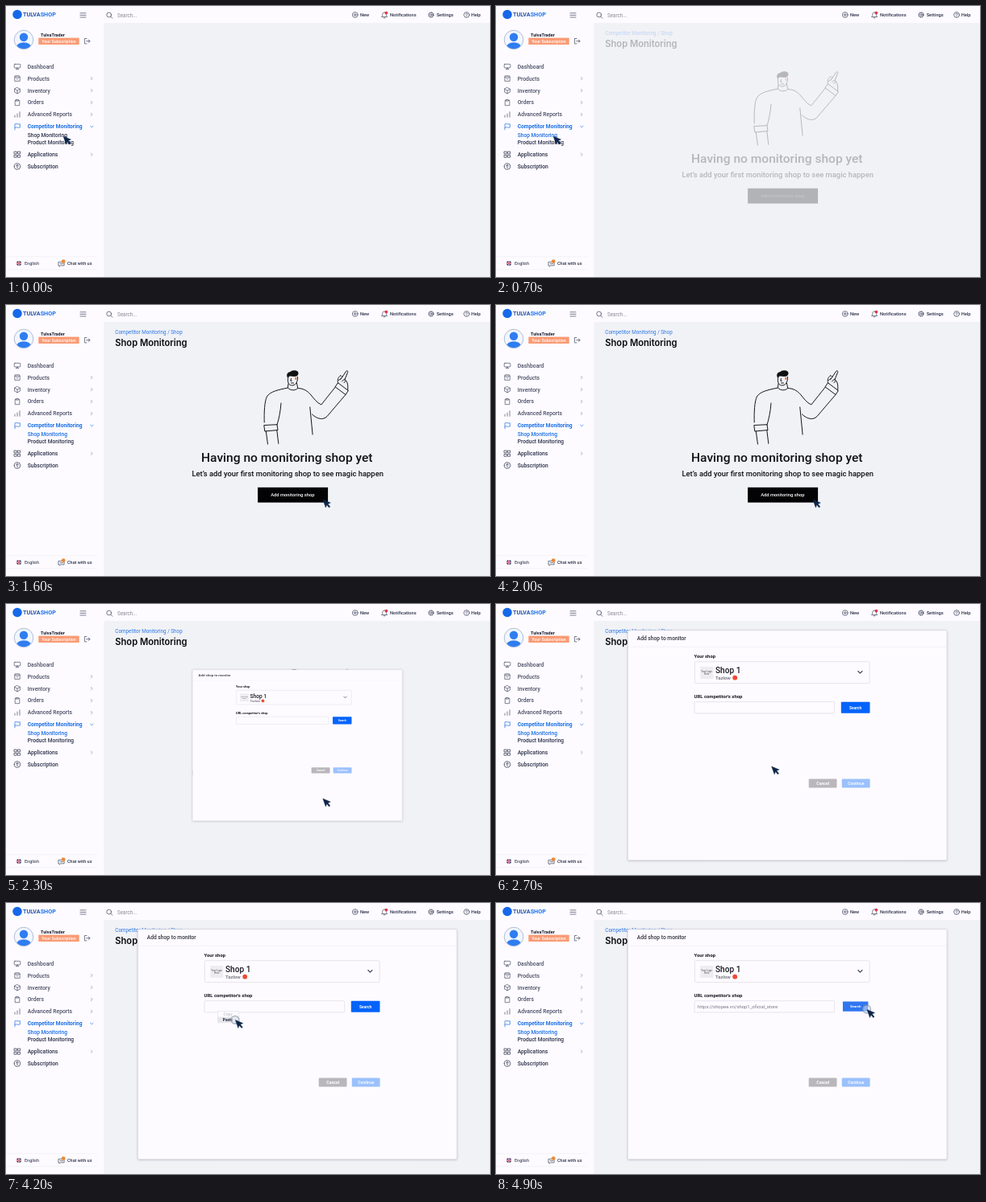
Animation, 600 px wide and 337 px high, one loop 5000 ms. Source, as an HTML page:

```html
<!DOCTYPE html>
<html lang="en">
<head>
<meta charset="utf-8">
<title>Shop monitoring</title>
<style>
html, body { margin: 0; width: 100%; height: 100%; overflow: hidden; background: #fdfbff; }
svg { display: block; width: 100vw; height: 100vh; }
text { font-family: Roboto, "Open Sans", sans-serif; }
.line { fill: none; stroke: #3f455d; stroke-width: .7; stroke-linecap: round; stroke-linejoin: round; }
</style>
</head>
<body>
<svg id="stage" viewBox="0 0 600 337">
  <defs>
    <clipPath id="face"><circle cx="22" cy="42" r="11.3"/></clipPath>
    <filter id="soft" x="-5%" y="-5%" width="110%" height="112%">
      <feDropShadow dx="0" dy=".6" stdDeviation="1.3" flood-color="#50506a" flood-opacity=".35"/>
    </filter>
  </defs>
  <rect width="600" height="337" fill="#fdfbff"/>
  <rect x="121.5" y="21" width="479" height="316" fill="#f1f2f6"/>

  <g id="side">
    <circle cx="14" cy="10.5" r="5.8" fill="#1668e8"/>
    <path class="line" d="M92 8.8h7M92 11.4h7M92 14h7"/>
    <circle cx="22" cy="42" r="11.8" fill="#f1f6ff" stroke="#8395b5" stroke-width=".6"/>
    <g clip-path="url(#face)" fill="#2f7df0">
      <circle cx="22" cy="38.8" r="5.2"/>
      <ellipse cx="22" cy="51.5" rx="9.2" ry="6.3"/>
    </g>
    <rect x="40.3" y="39.6" width="50.4" height="8.4" fill="#fa9a74"/>
    <path class="line" d="M100 40.5h-2.6v6.4h2.6M99.6 43.7h4.4M102.3 42l1.8 1.7-1.8 1.7"/>
    <path d="M0 311.7H113M0 327.7H113" stroke="#f0f0f5" stroke-width=".8"/>
    <circle cx="16" cy="320" r="3" fill="#28407f"/>
    <path d="M13 320h6M16 317v6" stroke="#fff" stroke-width="1.6"/>
    <path d="M13 320h6M16 317v6" stroke="#d33b4b" stroke-width=".9"/>
    <path class="line" d="M65.3 318.4h6.8v4.4h-4.4l-1.6 1.2v-1.2h-.8zM67 320.6h3.4"/>
    <circle cx="71.2" cy="317.6" r="2.4" fill="#e8893a"/>
  </g>

  <g id="top">
    <g class="line">
      <circle cx="127.7" cy="11" r="2.9"/><path d="M129.9 13.2l2 2.1"/>
      <circle cx="432.8" cy="11" r="3.4"/><path d="M430.9 11h3.8M432.8 9.1v3.8"/>
      <path d="M465.8 13.3c1-.8.9-1.5.9-2.8 0-3.4 4.8-3.4 4.8 0 0 1.3 0 2 .9 2.8zM468.2 14.8h1.8"/>
      <circle cx="527" cy="11" r="2.8"/><circle cx="527" cy="11" r="1.1"/>
      <circle cx="527" cy="11" r="3.3" stroke-dasharray="1.3 1.29" stroke-linecap="butt"/>
      <circle cx="571" cy="11" r="3.4"/><path d="M569.9 10.2c0-1.8 2.4-1.5 2.2 0-.1.7-1.1.7-1.1 1.6M571 13v.1"/>
    </g>
    <circle cx="471.4" cy="8.6" r="1.9" fill="#e2384a"/>
  </g>

  <g id="page">
    <g fill="none" stroke="#15151a" stroke-linecap="round" stroke-linejoin="round">
      <path d="M350 88.5c-.8 4-.8 7 .4 9.3 2 3 6.500 2.800 8.800.2 1.700-2 2.300-4.700 2.300-8.500M353.500 91.500l-.8 2.700 1.500.2M353.500 97h3"/>
      <path d="M350 98l-.6 5c3 3.300 8.800 4 12.400.5l-1.400-6.500M349.400 103c-12 2.500-22 4.500-26 11-3 6.500-3.500 19-3.200 32"/>
      <path d="M341 122c-.7 10-2.500 19-5 27M320.200 149.500l15.800-.8 1 6.800-15.800 1.500zM322.300 157l2.200 16M335.800 155.700l2 16.600"/>
      <path d="M361.800 103.500c6.200.2 11 2.500 15.500 7.500 4.500 5.500 8 10.500 13.500 13l17.500-22M376.800 127l3.300 34M379.500 136c6.500 6 13.500 7.500 18.500 2.500l23-27"/>
      <path d="M408.300 102l12.700 9.500 3.300-5-12.500-9.500zM411.700 97c-1.500-4 .2-7.300 3.300-9.500l1.700 1.800M414.800 92.500l7-10.300c1.200-1 2.300-.2 1.800 1.500l-3.800 9.500M412.500 93.500l2.800-2M416.500 95l2.800-2.800 2.200 1.800-2.500 2.700M421.500 94c2.500 2.500 2.500 7 2.200 12"/>
    </g>
    <path d="M349.200 90.500c-2.200-3.500-.5-7 3-7.300 2-2.500 9.300-3 10.200.8.400 2.300-.8 4.300-3 4.800-3 .5-5.500-.5-7.700-.3-1 .3-1.300 1.300-2.500 2z" fill="#111"/>
    <path d="M358.400 89.500l2.300.8-.8 2.600-1.900-.5z" fill="#e7804a"/>
    <rect x="312.100" y="226.800" width="87" height="18.800" fill="#030305"/>
  </g>

  <g id="modal">
    <rect x="163.400" y="32.700" width="395.600" height="286" rx="1.500" fill="#fdfbff" stroke="#d3d2da" stroke-width=".6" filter="url(#soft)"/>
    <path d="M164 53.300H558.500" stroke="#f1eff4" stroke-width=".8"/>
    <g fill="#fdfbff" stroke="#e0dfe7" stroke-width=".8">
      <rect x="246.400" y="71.700" width="216.800" height="26.900" rx="1.500"/>
      <rect x="246" y="121.700" width="173.600" height="14.300" rx="1"/>
    </g>
    <rect x="253.200" y="78" width="16" height="15" fill="#eeecf1"/>
    <path class="line" d="M448.800 83.500l2.600 2.600 2.600-2.600" style="stroke-width:1.100"/>
    <circle cx="296.200" cy="91.700" r="2.900" fill="#ee4a35"/>
    <rect x="387.700" y="217.600" width="34.800" height="11" rx="1" fill="#b9b6bc"/>
    <rect x="428.800" y="217.600" width="34.800" height="11" rx="1" fill="#9bc1fc"/>
    <g id="search"><rect id="searchBox" x="427.800" y="121.700" width="35.700" height="14" rx=".8"/></g>
  </g>

  <g id="menu">
    <rect x="262.300" y="134.300" width="26.200" height="14.600" fill="#fdfbff" stroke="#e2e1e8" stroke-width=".6"/>
    <rect id="hover" x="262.300" y="141.600" width="26.200" height="7.300" fill="#e6e6ed"/>
  </g>

  <circle id="ring" fill="rgba(232,234,242,.5)" stroke="#7f8a9f" stroke-opacity=".6"/>
  <path id="cursor" d="M0 0L9.500 4 6.300 5.400 9 8.800 7.700 9.900 4.900 6.600 3.500 9.900Z" fill="#0d2547" stroke="#0d2547" stroke-width=".4" stroke-linejoin="round"/>
</svg>
<script>
const NS = "http://www.w3.org/2000/svg";
const $ = id => document.getElementById(id);

function add(parent, tag, attrs, content) {
  const el = document.createElementNS(NS, tag);
  for (const k in attrs) el.setAttribute(k, attrs[k]);
  if (content) el.textContent = content;
  return $(parent).appendChild(el);
}

function label(parent, content, x, y, size, fill, weight = 500, extra = {}) {
  return add(parent, "text", { x, y, "font-size": size, fill, "font-weight": weight, ...extra }, content);
}
const mid = { "text-anchor": "middle" };

// Sidebar
const BLUE = "#1a6fe4", INK = "#4a4f66", DARK = "#2c314a";
label("side", "TULVA", 21, 13.3, 7.2, "#2a55a8", 700);
label("side", "SHOP", 42.7, 13.3, 7.2, "#1f74ee", 700);
label("side", "TulvaTrader", 43, 38.2, 5.5, "#16182a", 700);
label("side", "Your Subscription", 65.5, 45.7, 5.3, "#fff1ea", 700, mid);
label("side", "English", 23, 322, 5.5, INK);
label("side", "Chat with us", 76, 322, 5.5, DARK);

// name, y, icon centred on 0,0, chevron
const rows = [
  ["Dashboard", 75.3, "M-3-3h6q.8 0 .8.8v3q0 .8-.8.8h-6q-.8 0-.8-.8v-3q0-.8.8-.8zM-1.500 3.200L0 1.600 1.500 3.200z"],
  ["Products", 90.2, "M-2.400-3.400h4.800l.8 1.400v5.200h-6.400v-5.200zM-3.200-1.900h6.400M-1.300-.4c.3 1.700 2.300 1.700 2.600 0", "right"],
  ["Inventory", 105.2, "M0-3.700l3.400 1.800v3.800L0 3.700l-3.400-1.800v-3.800zM-3.400-1.900L0 0l3.400-1.900M0 0v3.700", "right"],
  ["Orders", 120.1, "M-1.300-2.800h-1.500v6.400h5.600v-6.400h-1.500M-1.300-3.600h2.600v1.600h-2.600z", "right"],
  ["Advanced Reports", 135, "M-3 3.300V1M0 3.300v-4.300M3 3.300v-6.600", "right"],
  ["Competitor Monitoring", 150, "M-3 3.800v-7c2-1 4 .8 6.300-.1v4.300c-2.300.9-4.300-.9-6.300.1", "down"],
  ["Applications", 184.6, "M-3.600-3.600h2.800v2.800h-2.800zM.8-3.600h2.800v2.800h-2.800zM-3.600.8h2.800v2.800h-2.800zM.8.8h2.800v2.800h-2.800z", "right"],
  ["Subscription", 199.5, "M-3.800 0a3.800 3.800 0 1 0 7.600 0a3.800 3.800 0 1 0-7.600 0M0 2v-4M-1.600-.5L0-2.100 1.600-.5"]
];
const chevrons = { right: "M-.9-1.700L.8 0-.9 1.700", down: "M-1.700-.8L0 .8l1.700-1.600" };
rows.forEach(([name, y, icon, chevron], i) => {
  const on = chevron === "down";
  const color = on ? BLUE : i > 5 ? DARK : INK;
  add("side", "path", { class: "line", d: icon, transform: `translate(14 ${y})`, style: `stroke:${color}` });
  label("side", name, 26.7, y + 2.3, on ? 6.65 : 6.75, color, on ? 700 : 500);
  if (chevron) add("side", "path", {
    class: "line", d: chevrons[chevron], transform: `translate(106.300 ${y})`,
    style: `stroke:${on ? BLUE : "#8a8fa0"}`
  });
});
const shopLink = label("side", "Shop Monitoring", 26.7, 162.6, 6.65, DARK);
label("side", "Product Monitoring", 26.7, 172.1, 6.65, DARK);

// Top bar
label("top", "Search...", 138, 13.6, 6.3, "#8b8b95", 400);
[["New", 439], ["Notifications", 476], ["Settings", 533.7], ["Help", 576.7]]
  .forEach(([s, x]) => label("top", s, x, 13.1, 5.7, DARK));

// Page
label("page", "Competitor Monitoring / Shop", 135.3, 35.7, 6.3, "#2b78e4", 400);
label("page", "Shop Monitoring", 135.3, 51, 11.15, "#08080c", 600, { style: "font-family:Inter,sans-serif" });
label("page", "Having no monitoring shop yet", 348.3, 194.5, 15.55, "#111116", 500, mid);
label("page", "Let’s add your first monitoring shop to see magic happen", 349.2, 213.3, 9.4, "#111116", 500, mid);
const addText = label("page", "Add monitoring shop", 355.3, 238.3, 5.8, "#fff", 500, mid);

// Dialog
label("modal", "Add shop to monitor", 174.7, 45.3, 6.7, "#33333f");
label("modal", "Your shop", 245.5, 67, 5.85, "#15151c", 700);
label("modal", "Your Logo", 261.2, 84.8, 3, "#66666f", 500, mid);
label("modal", "Here", 261.2, 88.4, 3, "#66666f", 500, mid);
label("modal", "Shop 1", 272, 85.8, 10.1, "#1a1a22");
label("modal", "Tazlow", 272, 93.8, 6, "#6b6b75");
label("modal", "URL competitor's shop", 245.5, 117.2, 5.95, "#15151c", 700);
label("modal", "Cancel", 405.2, 224.7, 5.1, "#fff", 700, mid);
label("modal", "Continue", 446.3, 224.7, 5, "#f2f7ff", 700, mid);
label("search", "Search", 445.7, 130.6, 4.9, "#fff", 700, mid);
const url = label("modal", "https://shopee.vn/shop1_oficial_store", 250, 131, 5.9, "#777781", 400);
label("menu", "Copy", 275, 139.7, 4.9, "#b9b9c2", 400, mid);
label("menu", "Paste", 275, 146.8, 4.8, "#23253a", 700, mid);

// Motion
const LOOP = 5000, STEP = 100;
const path = [
  [0, 71, 162], [1000, 71, 162], [1500, 392.8, 242], [2450, 392.8, 242],
  [3050, 256.7, 135.5], [3700, 256.7, 135.5], [4100, 284.3, 145.6],
  [4350, 284.3, 145.6], [4800, 460, 132.6], [LOOP, 460, 132.6]
];
const clicks = [[3100, 256.3, 135.2], [4100, 284, 145.3], [4800, 459.5, 132]];
const clamp = v => Math.max(0, Math.min(1, v));
const part = (t, a, b) => clamp((t - a) / (b - a));
const ease = k => k * k * (3 - 2 * k);
const show = (el, on) => { el.style.display = on ? "" : "none"; };
const scaleAt = (x, y, s) => `translate(${x} ${y}) scale(${s}) translate(${-x} ${-y})`;

function draw(t) {
  shopLink.setAttribute("fill", t < 400 ? DARK : BLUE);
  const fade = part(t, 560, 1100);
  $("page").setAttribute("opacity", fade);
  addText.setAttribute("opacity", fade);

  const grow = part(t, 2108, 2400);
  show($("modal"), grow > 0);
  $("modal").setAttribute("transform", scaleAt(361.2, 175.7, grow));
  show(url, t >= 4300);

  const pressed = t >= 4800;
  $("search").setAttribute("transform", scaleAt(445.7, 128.7, pressed ? .88 : 1));
  $("searchBox").setAttribute("fill", pressed ? "#2f76f2" : "#0563fa");

  show($("menu"), t >= 3200 && t < 4300);
  show($("hover"), t >= 4000);

  const click = clicks.find(c => t >= c[0] && t <= c[0] + 300);
  show($("ring"), click);
  if (click) {
    const k = (t - click[0]) / 300;
    $("ring").setAttribute("cx", click[1]);
    $("ring").setAttribute("cy", click[2]);
    $("ring").setAttribute("r", 4 + 2.5 * k);
    $("ring").setAttribute("stroke-width", 2.2 - 1.6 * k);
  }

  const i = path.findIndex((p, n) => n && t < p[0]);
  const [a, x0, y0] = path[i - 1], [b, x1, y1] = path[i];
  const k = ease(part(t, a, b));
  $("cursor").setAttribute("transform", `translate(${x0 + (x1 - x0) * k} ${y0 + (y1 - y0) * k})`);
}

const start = performance.now();
function tick() {
  const t = (performance.now() - start) % LOOP;
  draw(Math.floor(t / STEP) * STEP);
  requestAnimationFrame(tick);
}
tick();
</script>
</body>
</html>
```
